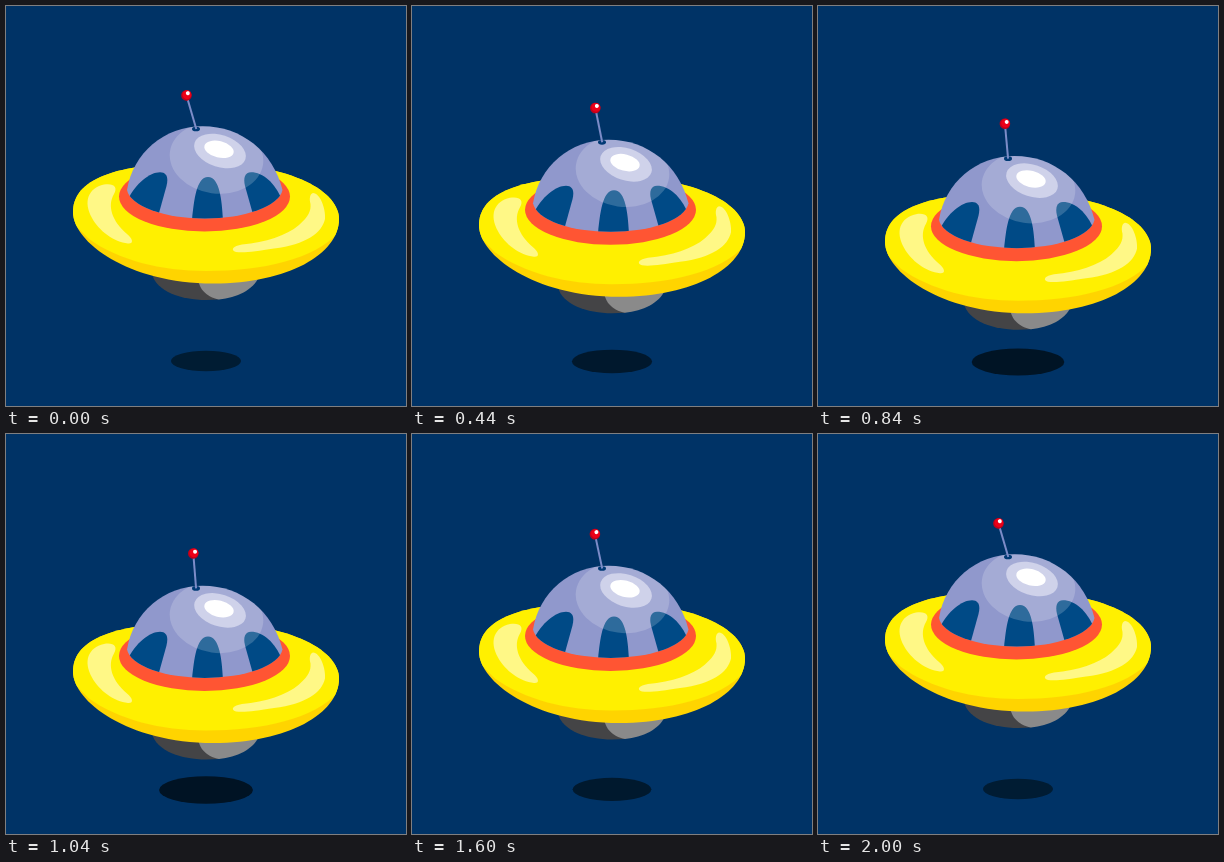
Animation of 400x400 px, one loop 2040 ms. Source, as an HTML page:

```html
<!DOCTYPE html>
<html lang="en">
<head>
<meta charset="utf-8">
<title>Hovering saucer</title>
<style>
  html, body { margin: 0; width: 100%; height: 100%; overflow: hidden; background: #003366; }
  svg { display: block; width: 100vw; height: 100vh; }
</style>
</head>
<body>
<svg viewBox="0 0 400 400">
  <defs>
    <clipPath id="domeClip">
      <path id="domeShape" d="M121 184C127 147 158 120.300 196.500 120.300C236 120.300 267 146 276.500 184A78 31 0 0 1 121 184Z"/>
    </clipPath>
    <clipPath id="discClip">
      <path id="discShape" d="M67 206C67 178 98 157 193 157C290 157 333 187 333 213C333 248 282 277.500 207 277.500C122 277.500 67 236 67 206Z"/>
    </clipPath>
  </defs>

  <ellipse id="shadow" cx="200"/>

  <g id="ship">
    <!-- hull -->
    <path fill="#444446" d="M146 268C150 285 175 294 200 294L213 293.500L230 268Z"/>
    <path fill="#8a8a8a" d="M192 268C191 282 200 291 213 293.500C231 291.500 247 284 253 271V268Z"/>

    <!-- disc -->
    <use href="#discShape" fill="#ffd400"/>
    <path clip-path="url(#discClip)" fill="#fff000" d="M60 150H340V216C320 251 262 265 200 265C155 265 112 254 83 233L60 210Z"/>
    <g fill="#fff886">
      <path d="M98 178.500C108 177 112 181 108 188C101 200 106 215 121 228C127 233 128 238 122 237.500C108 236 93 225 86 212C77 196 82 182 98 178.500Z"/>
      <path d="M307 187C314 187 320 203 319 213C316 227 300 238.500 268 242.500C250 245.500 238 247 230 246C224 244 227 240 236 238.500C260 236 280 230 293 219C303 210 305 205 304.500 198C303 192 304 188 307 187Z"/>
    </g>
    <ellipse cx="198.500" cy="190.500" rx="85.500" ry="35" fill="#ff5533"/>

    <!-- dome -->
    <use href="#domeShape" fill="#9098cc"/>
    <g clip-path="url(#domeClip)">
      <g fill="#004a86">
        <path d="M119 200C127 179 143 166.300 154 166.300C161 166.300 162.500 172 160.500 180L153 207L145 214H119Z"/>
        <path d="M186 214C188 196 190 171 202 171C214 171 216 196 217 214Z"/>
        <path d="M248 212L239 180C237 172 239 166.300 245 166.300C257 166.300 269 177 276 194L270 212Z"/>
      </g>
      <ellipse cx="210.500" cy="152" rx="47" ry="35.500" transform="rotate(8 210.500 152)" fill="#fff" opacity=".18"/>
    </g>
    <ellipse cx="214" cy="145" rx="26.700" ry="16" transform="rotate(18 214 145)" fill="#cfd2ea"/>
    <ellipse cx="213" cy="143.300" rx="15" ry="8.200" transform="rotate(14 213 143.300)" fill="#fff"/>

    <!-- antenna -->
    <ellipse cx="190" cy="123" rx="4" ry="2.300" fill="#003a75"/>
    <g id="antenna">
      <path d="M190 123V91" stroke="#7c8cc8" stroke-width="2"/>
      <circle cx="190" cy="88" r="5.300" fill="#c0001a"/>
      <circle cx="190.700" cy="87.500" r="4.400" fill="#ec0018"/>
      <circle cx="191.900" cy="86.300" r="2" fill="#fff"/>
    </g>
  </g>
</svg>
<script>
  const LOOP = 2040, STEP = 40;
  const [ship, antenna, shadow] = ["ship", "antenna", "shadow"].map(id => document.getElementById(id));
  const set = (el, attrs) => Object.entries(attrs).forEach(([k, v]) => el.setAttribute(k, v));
  const mix = (a, b, s) => a + (b - a) * s;

  function draw(now) {
    const t = Math.floor((now % LOOP) / STEP) * STEP;
    // s: 0 at the highest point, 1 at the lowest
    const s = (1 - Math.cos(2 * Math.PI * (t + STEP / 2) / LOOP)) / 2;

    set(ship, { transform: `translate(0 ${mix(0, 31.5, s)})` });
    set(antenna, { transform: `rotate(${mix(-16.3, -4.5, s)} 190 122)` });
    set(shadow, {
      cy: mix(355, 356, s),
      rx: mix(35, 47, s),
      ry: mix(10.3, 13.7, s),
      fill: `rgb(0 ${mix(28, 19, s)} ${mix(51, 36, s)})`
    });
  }

  const start = performance.now();
  function tick() {
    draw(performance.now() - start);
    requestAnimationFrame(tick);
  }
  tick();
</script>
</body>
</html>
```
